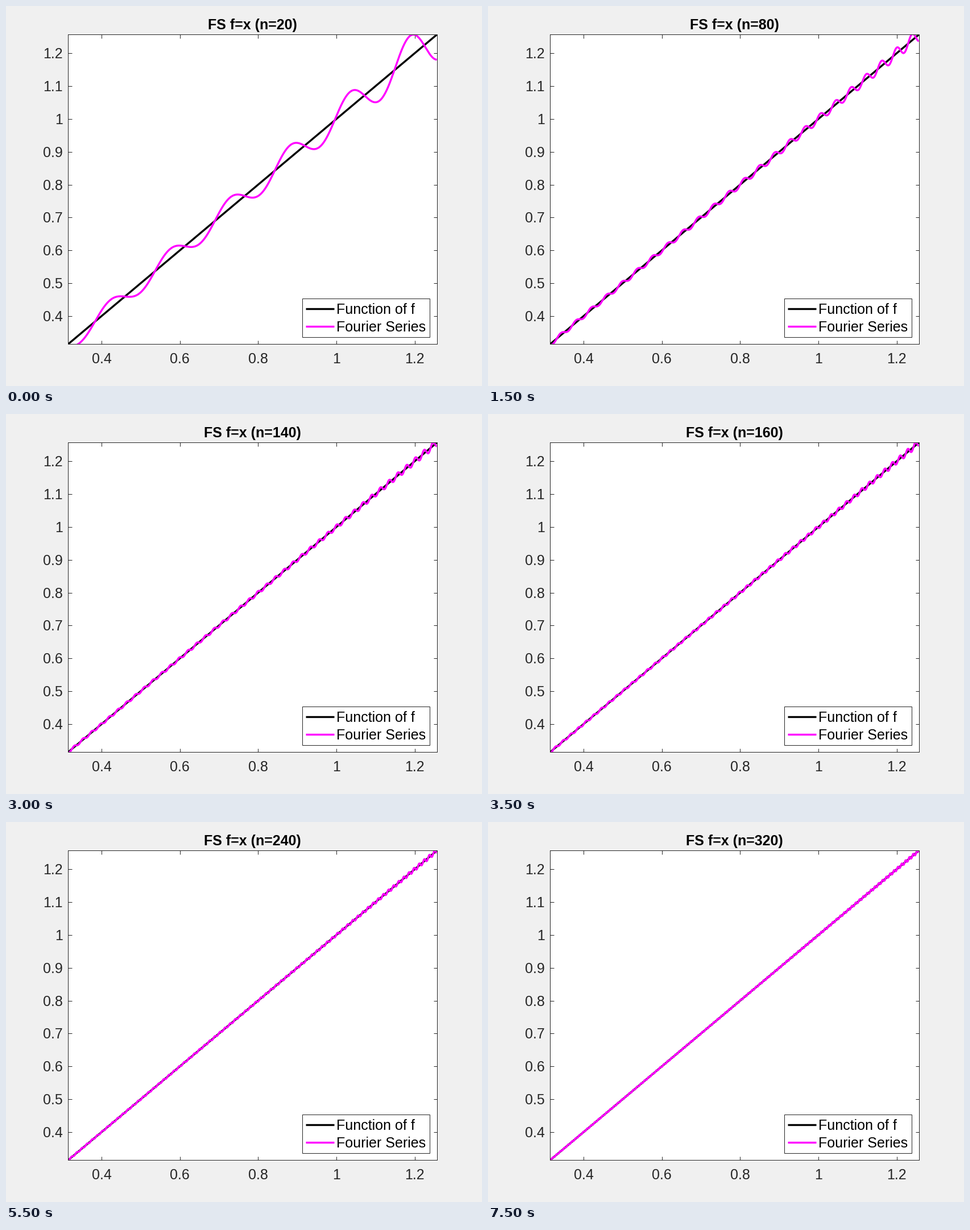
A matplotlib script that plays this animation: 837x669 px, repeating every 8 s.

```python
import numpy as np
import matplotlib.pyplot as plt
from matplotlib.animation import FuncAnimation
from matplotlib.lines import Line2D
from matplotlib.patches import Rectangle
from matplotlib.transforms import IdentityTransform

W, H, DPI = 837, 669, 100
LEFT, RIGHT, TOP, BOTTOM = 109, 757.5, 50.5, 595.5
PT = 72 / DPI
INK = "#262626"
LINE = 3.4 * PT
THIN = 1 * PT

plt.rcParams["font.family"] = "Liberation Sans"
# The small margin keeps the pixel size from being rounded down.
fig = plt.figure(figsize=((W + 0.01) / DPI, (H + 0.01) / DPI), dpi=DPI, facecolor="#f0f0f0")
ax = fig.add_axes([LEFT / W, 1 - BOTTOM / H, (RIGHT - LEFT) / W, (BOTTOM - TOP) / H])
pixels = IdentityTransform()


def label(x, y, text, **style):
    """Place text with its baseline at a pixel position measured from the top left."""
    options = dict(fontsize=25 * PT, color=INK, va="baseline", transform=pixels)
    return fig.text(x, H - y, text, **{**options, **style})


lo, hi = 0.1 * np.pi, 0.4 * np.pi
ax.set(xlim=(lo, hi), ylim=(lo, hi))
x_ticks = np.arange(4, 13, 2) / 10
y_ticks = np.arange(4, 13) / 10
ax.set_xticks(x_ticks, [""] * len(x_ticks))
ax.set_yticks(y_ticks, [""] * len(y_ticks))
ax.tick_params(direction="in", length=6.5 * PT, width=THIN, color=INK, top=True, right=True)
for spine in ax.spines.values():
    spine.set(linewidth=THIN, edgecolor=INK)

for v in x_ticks:
    px = LEFT + (v - lo) / (hi - lo) * (RIGHT - LEFT)
    label(px, 628.5, f"{v:g}", ha="center")
for v in y_ticks:
    py = BOTTOM - (v - lo) / (hi - lo) * (BOTTOM - TOP)
    label(99.5, py + 9, f"{v:g}", ha="right")
title = label((LEFT + RIGHT) / 2 + 0.5, 41, "", ha="center", weight="bold", color="black")

# Legend
fig.add_artist(Rectangle((520.5, H - 582.5), 224, 68, facecolor="white",
                         edgecolor=INK, linewidth=THIN, transform=pixels))
for y, color, name in ((533, "black", "Function of f"), (564, "magenta", "Fourier Series")):
    fig.add_artist(Line2D([527, 577], [H - y, H - y], color=color, linewidth=LINE,
                          solid_capstyle="butt", transform=pixels))
    label(581, y + 9, name, color="black")

x = np.linspace(lo, hi, 3000)
ax.plot(x, x, color="black", linewidth=LINE, solid_capstyle="butt")
series, = ax.plot([], [], color="magenta", linewidth=LINE, solid_capstyle="butt")


def partial_sum(n):
    """Fourier series of f(x) = x on (-pi/2, pi/2), cut after n terms."""
    k = np.arange(1, n + 1)
    return np.sin(2 * np.outer(x, k)) @ ((-1.0) ** (k + 1) / k)


def update(i):
    n = 20 * (i + 1)
    series.set_data(x, partial_sum(n))
    title.set_text(f"FS f=x (n={n})")
    return series, title


anim = FuncAnimation(fig, update, frames=16, interval=500, repeat=True, repeat_delay=0)
plt.show()
```
